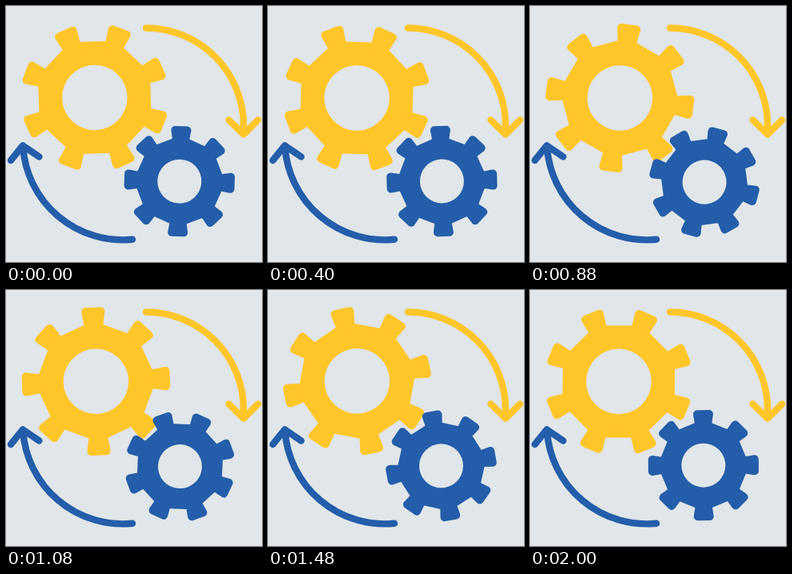
These frames come from a looping animation (320x320 px, 2.04 s). An HTML page:

```html
<!DOCTYPE html>
<html lang="en">
<head>
<meta charset="utf-8">
<title>Meshing gears</title>
<style>
  html, body { margin: 0; width: 100%; height: 100%; overflow: hidden; background: #e0e6e9; }
  svg { display: block; width: 100vw; height: 100vh; }
  path { stroke-width: 10; stroke-linejoin: round; stroke-linecap: round; }
  circle { fill: #e0e6e9; }
  .yellow { fill: #ffc629; stroke: #ffc629; }
  .blue { fill: #245da9; stroke: #245da9; }
  .arrow { fill: none; stroke-width: 8.4; }
</style>
</head>
<body>
<svg viewBox="0 0 320 320">
  <path class="yellow arrow" d="M175 27.500A122 122 0 0 1 297 150V160.500M278.500 142.500L297 160.500L315 142.500"/>
  <path class="blue arrow" d="M158 291.800A125 125 0 0 1 21.200 176M6 193L21 174.500L41.500 188.500"/>
  <g id="big"><path class="yellow"/><circle r="40.800"/></g>
  <g id="small"><path class="blue"/><circle r="27.500"/></g>
</svg>
<script>
const LOOP = 2040, STEP = 40, TEETH = 8;

// Tooth sizes are inset by half the stroke, which rounds the corners.
function gearPath(tip, tipHalf, valley, baseHalf) {
  const a = Math.PI / TEETH;
  const base = (valley - baseHalf * Math.sin(a)) / Math.cos(a);
  const tooth = [[-baseHalf, -base], [-tipHalf, -tip], [tipHalf, -tip], [baseHalf, -base]];
  const points = [];
  for (let i = 0; i < TEETH; i++) {
    const c = Math.cos(2 * a * i), s = Math.sin(2 * a * i);
    for (const [x, y] of tooth)
      points.push((x * c - y * s).toFixed(2) + " " + (x * s + y * c).toFixed(2));
  }
  return "M" + points.join("L") + "Z";
}

// The pivot sits slightly off the gear centre, so each gear wobbles.
function makeGear(id, pivot, offset, phase, direction, sizes) {
  const group = document.getElementById(id);
  group.querySelector("path").setAttribute("d", gearPath(...sizes));
  return turn => group.setAttribute("transform",
    `translate(${pivot}) rotate(${direction * turn}) translate(${offset}) rotate(${phase})`);
}

const gears = [
  makeGear("big", [111.7, 114.5], [-0.8, 0], 15.8, -1, [87.5, 9.6, 65, 6.4]),
  makeGear("small", [217.3, 219.8], [-0.4, -0.7], 6.8, 1, [64, 7.5, 48, 5.2])
];

// One full turn per loop, slow at the ends and fast in the middle.
function turnAt(x) {
  const a = 2 * Math.PI * x;
  return 360 * x - 35.7 * Math.sin(a + 0.09) - 2.2 * Math.sin(2 * a + 0.86);
}

function draw() {
  const t = Math.floor(performance.now() / STEP) * STEP;
  const turn = turnAt(t % LOOP / LOOP);
  for (const rotate of gears) rotate(turn);
  requestAnimationFrame(draw);
}
draw();
</script>
</body>
</html>
```
